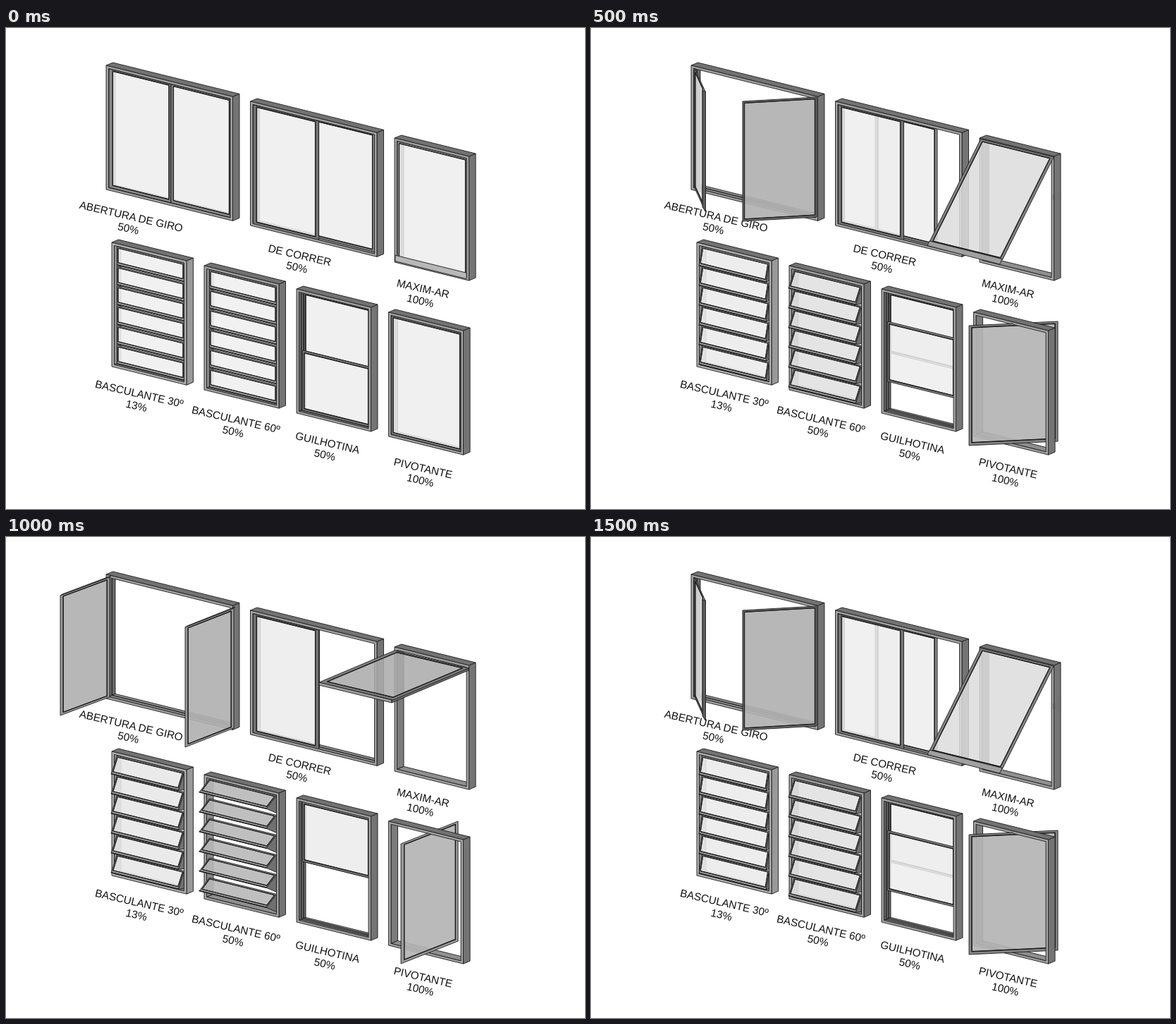
Write an HTML page that moves like this. It is 821x682 px and loops after 2 s.

```html
<!DOCTYPE html>
<html lang="pt">
<head>
<meta charset="utf-8">
<title>Tipos de janela</title>
<style>
html, body { margin: 0; width: 100%; height: 100%; overflow: hidden; background: #fff; }
svg { display: block; width: 821px; height: 682px; }
text { font: 15.2px "Liberation Sans", Arial, sans-serif; text-anchor: middle; fill: #111; }
path { stroke-linejoin: round; }
</style>
</head>
<body>
<svg id="stage" viewBox="0 0 821 682" xmlns="http://www.w3.org/2000/svg">
  <defs>
    <clipPath id="near"><rect width="599" height="682"/></clipPath>
    <clipPath id="far"><rect x="599" width="222" height="682"/></clipPath>
  </defs>
</svg>
<script>
const H = 176, RIM = 3.5, SLOPE = 0.2475, INK = '#1e1e1e';
const stage = document.getElementById('stage');
let out = '';

// u runs along the wall, v down, w through the wall thickness
const plane = (x, y) => (u, v, w = 0) => [x + u + 9.5 * w, y + SLOPE * u + v - 4 * w];
const add = (p, q) => [p[0] + q[0], p[1] + q[1]];
const sub = (p, q) => [p[0] - q[0], p[1] - q[1]];
const track = pts => 'M' + pts.map(p => p.map(n => n.toFixed(1)).join()).join('L') + 'Z';

function shape(rings, fill, line = INK, width = 0.9, alpha = 1) {
  out += `<path d="${rings.map(track).join('')}" fill="${fill}" fill-rule="evenodd" ` +
    `fill-opacity="${alpha}" stroke="${line}" stroke-width="${width}"/>`;
}
const poly = (pts, ...style) => shape([pts], ...style);

function reveal(at, W, jamb, rails = 0) {
  const l = RIM, r = W - RIM, b = H - RIM;
  poly([at(l, l), at(l, b), at(l, b, 1), at(l, l, 1)], jamb);
  poly([at(l, b), at(r, b), at(r, b, 1), at(l, b, 1)], '#8f8f8f');
  for (let i = 1; i <= rails; i++) {
    const w = i / (rails + 1);
    poly([at(l, l, w), at(l, b, w), at(r, b, w), at(l, b, w)], 'none', INK, 1.2);
  }
}

function shell(at, W, side = '#747474', face = '#a2a2a2') {
  const l = RIM, r = W - RIM, b = H - RIM;
  poly([at(0, 0), at(W, 0), at(W, 0, 1), at(0, 0, 1)], '#727272');
  poly([at(W, 0), at(W, H), at(W, H, 1), at(W, 0, 1)], side);
  shape([[at(0, 0), at(W, 0), at(W, H), at(0, H)], [at(l, l), at(r, l), at(r, b), at(l, b)]], face);
}

// Glazed parallelogram: corner a, neighbours b and d, border [left, top, right, bottom]
function leaf(a, b, d, border, { rim = '#8a8a8a', glass = '#eeeeee', alpha = 0.85, line = 1.4 } = {}) {
  const ab = sub(b, a), ad = sub(d, a), w = Math.hypot(...ab), h = Math.hypot(...ad);
  const mix = (s, t) => [a[0] + ab[0] * s + ad[0] * t, a[1] + ab[1] * s + ad[1] * t];
  const [l, t, r, o] = [border[0] / w, border[1] / h, 1 - border[2] / w, 1 - border[3] / h];
  const inner = [mix(l, t), mix(r, t), mix(r, o), mix(l, o)];
  poly(inner, glass, 'none', 0, alpha);
  shape([[a, b, mix(1, 1), d], inner], rim, INK, 0.9);
  poly(inner, 'none', INK, line);
}

const sash = (at, u0, v0, u1, v1, border, look) =>
  leaf(at(u0, v0), at(u1, v0), at(u0, v1), border, look);

const SHADE = { glass: '#b1b1b1', alpha: 0.92, rim: '#858585' };

function casement(pose) {
  const at = plane(142, 53), W = 179.5;
  reveal(at, W, '#6a6a6a', 1);
  if (pose === 0) {
    sash(at, 4, 4, 91.5, 172, [5.5, 2, 2.5, 4]);
    sash(at, 92, 4, 176, 172, [3.5, 2, 1.5, 4]);
  }
  shell(at, W);
  if (pose === 1) {
    leaf([147, 57], [162, 90], [147, 227], [2, 4, 9, 4], { glass: '#e4e4e4' });
    poly([[158, 89], [162.5, 90], [162.5, 260], [158, 254]], '#5c5c5c');
    leaf([215, 104], [320, 98], [215, 274], [2.5, 2.5, 2.5, 3], { ...SHADE, rim: '#6c6c6c' });
  }
  if (pose === 2) {
    for (const [x, y, dx, dy] of [[77, 83, 70, -26], [254, 128, 69, -27]]) {
      poly([[x, y], [x + 3, y - 2], [x + dx + 2, y + dy - 2], [x + dx, y + dy]], '#777');
      leaf([x, y], [x + dx, y + dy], [x, y + 170], [4.5, 2.5, 4, 3], { ...SHADE, rim: '#999' });
    }
  }
}

function sliding(pose) {
  const at = plane(346.5, 104), W = 179.5, s = [0, 36.5, 83][pose];
  reveal(at, W, '#666', 1);
  sash(at, 93 - s, 3, 177 - s + (pose ? 4 : 0), 170, [4, 2, 4, 3]);
  sash(at, 4, 4, 97, 173, [5, 2, 5, 4], { rim: '#747474' });
  shell(at, W);
}

function awning(pose) {
  const at = plane(551, 156), W = 105.5;
  reveal(at, W, '#7c7c7c');
  if (pose === 0) {
    sash(at, 4, 4, 102, 172, [2.5, 2, 1.5, 5], { rim: '#b0b0b0' });
  }
  shell(at, W);
  if (pose === 0) {
    poly([at(1, 166), at(102, 166), at(102, 174.5), at(1, 174.5)], '#b8b8b8');
  }
  if (pose === 1) {
    poly([[655.5, 236], [657.5, 236], [657.5, 244], [655.5, 244]], '#444', 'none');
    leaf([552.5, 157.5], [656, 183], [480, 303], [4, 3, 4, 2],
      { glass: '#dcdcdc', alpha: 0.86, rim: '#828282' });
    poly([[480, 302], [583, 327.5], [579.5, 335], [477, 308.5]], '#a0a0a0');
  }
  if (pose === 2) {
    poly([[444, 206], [547, 231], [547, 235], [444, 210]], '#a0a0a0');
    poly([[547, 231], [656, 186], [656, 189], [547, 235]], '#6c6c6c');
    leaf([551, 161], [656, 186], [444, 206], [6, 3, 6, 6],
      { glass: '#acacac', alpha: 0.87, rim: '#808080' });
  }
}

function louvre(x, y, angle, glass, side, face) {
  const at = plane(x, y), W = 106, rad = angle * Math.PI / 180;
  const swing = [-16.5 * Math.sin(rad), 26 * Math.cos(rad) + 6.8 * Math.sin(rad)];
  reveal(at, W, '#8a8a8a');
  shell(at, W, side, face);
  for (let k = 5; k >= 0; k--) {
    const v = 4 + 28 * k, a = at(7.5, v), b = at(102.5, v), d = add(a, swing), c = add(b, swing);
    if (angle) poly([b, c, add(b, [0, 25])], '#707070');
    leaf(a, b, d, [1.5, 2, 1.5, 3.5], { glass, alpha: 0.9, rim: '#9a9a9a', line: 1.1 });
    poly([d, c, d], 'none', INK, 1.5);
  }
}

function hung(pose) {
  const at = plane(412, 370), W = 105.5, s = 41 * pose;
  reveal(at, W, '#686868', 2);
  sash(at, 11, 3, 104, 88, [2, 2, 2, 3]);
  sash(at, 8.5, 85 - s, 103.5, 170 - s, [2.5, 3, 2, 3], { rim: '#808080' });
  shell(at, W);
}

function pivot(pose) {
  const at = plane(542.5, 403), W = 106;
  const half = where => {
    out += `<g clip-path="url(#${where})">`;
    if (pose === 1) {
      leaf([536, 422], [662, 416], [536, 592], [4, 3, 4, 4], { ...SHADE, glass: '#b5b5b5' });
    } else {
      leaf([560, 435], [641, 403], [560, 605], [5, 3, 4, 4],
        { ...SHADE, glass: '#b5b5b5', rim: '#999' });
    }
    out += '</g>';
  };
  reveal(at, W, '#7c7c7c');
  if (pose) half('far');
  else sash(at, 4, 4, 102.5, 172, [2.5, 2, 1.5, 3]);
  shell(at, W);
  if (pose) half('near');
}

function label(x, y, name, share) {
  out += `<g transform="translate(${x} ${y}) rotate(13)">` +
    `<text y="5.4">${name}</text><text y="22.9">${share}%</text></g>`;
}

function layer(draw) {
  const g = document.createElementNS('http://www.w3.org/2000/svg', 'g');
  out = '';
  draw();
  g.innerHTML = out;
  stage.append(g);
  return g;
}

layer(() => [
  [177.5, 267, 'ABERTURA DE GIRO', 50],
  [416.5, 322, 'DE CORRER', 50],
  [591.5, 369.5, 'MAXIM-AR', 100],
  [189, 518.5, 'BASCULANTE 30º', 13],
  [326, 555, 'BASCULANTE 60º', 50],
  [456, 588, 'GUILHOTINA', 50],
  [591.5, 624, 'PIVOTANTE', 100],
].forEach(row => label(...row)));

const order = [0, 1, 2, 1];
for (const pose of [0, 1, 2]) {
  const g = layer(() => {
    casement(pose);
    sliding(pose);
    awning(pose);
    louvre(150, 304, 15 * pose, ['#f0f0f0', '#ececec', '#e8e8e8'][pose], '#999', '#b0b0b0');
    louvre(281, 337, 30 * pose, ['#f0f0f0', '#e2e2e2', '#b8b8b8'][pose]);
    hung(pose);
    pivot(pose);
  });
  const steps = order.flatMap((p, i) => [0, 1].map(end =>
    ({ opacity: p === pose ? 1 : 0, offset: (i + end) / order.length })));
  g.animate(steps, { duration: 2000, iterations: Infinity });
}
</script>
</body>
</html>
```
